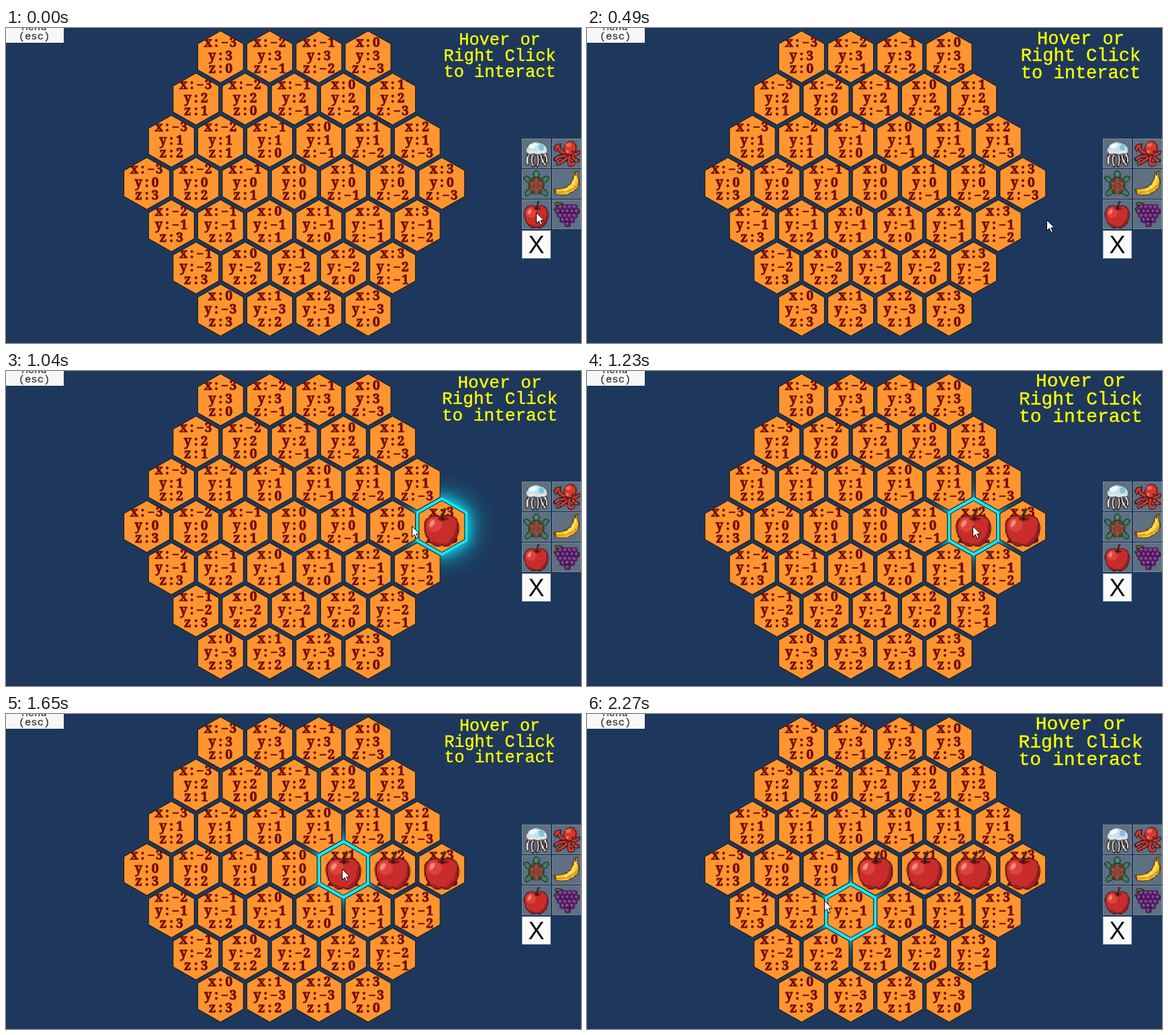
Write an HTML page with a canvas that moves like this. It is 856 by 470 pixels and loops after 2370 ms.

```html
<!DOCTYPE html>
<html lang="en">
<head>
<meta charset="utf-8">
<title>Hex board</title>
<style>
html, body { margin: 0; width: 100%; height: 100%; overflow: hidden; background: #1d385c; }
canvas { display: block; }
</style>
</head>
<body>
<canvas id="stage" width="856" height="470"></canvas>
<script>
const W = 856, H = 470, LOOP = 2370, LAST_CHANGE = 2270;
const ctx = document.getElementById('stage').getContext('2d');
const INK = '#241519';

// time, x, y of the pointer tip
const pointerPath = [
  [0, 789, 275], [230, 785, 277], [490, 685, 286], [560, 636, 284], [640, 604, 270],
  [700, 600, 254], [730, 615, 245], [820, 637, 238], [950, 637, 236], [1040, 604, 231],
  [1130, 575, 231], [1270, 573, 231], [1410, 510, 230], [1500, 503, 231], [1680, 500, 231],
  [1800, 442, 231], [1920, 417, 230], [2040, 420, 231], [2160, 372, 269], [2270, 353, 278]
];
// start time, hex x, hex y
const hovers = [
  [540, 3, -1], [650, 2, 0], [745, 3, 0], [1055, 2, 0],
  [1370, 1, 0], [1820, 0, 0], [2130, 0, -1]
];
// time, hex x on the middle row
const placements = [[870, 3], [1200, 2], [1600, 1], [2020, 0]];

function layer(w, h, draw) {
  const canvas = document.createElement('canvas');
  canvas.width = w;
  canvas.height = h;
  draw(canvas.getContext('2d'));
  return canvas;
}

function hexCenter(x, y) {
  return [429.2 + 73.2 * (x + y / 2), 232 - 63 * y];
}

function hexPath(c, cx, cy, half, tall) {
  c.beginPath();
  c.moveTo(cx, cy - tall);
  c.lineTo(cx + half, cy - tall / 2);
  c.lineTo(cx + half, cy + tall / 2);
  c.lineTo(cx, cy + tall);
  c.lineTo(cx - half, cy + tall / 2);
  c.lineTo(cx - half, cy - tall / 2);
  c.closePath();
}

function heavyText(c, text, x, y, extra) {
  c.lineWidth = extra;
  c.strokeStyle = c.fillStyle;
  c.fillText(text, x, y);
  c.strokeText(text, x, y);
}

function spacedText(c, text, cx, baseline, pitch) {
  [...text].forEach((ch, i) =>
    heavyText(c, ch, cx + (i - (text.length - 1) / 2) * pitch, baseline, .8));
}

function drawHex(c, x, y) {
  const [cx, cy] = hexCenter(x, y);
  hexPath(c, cx, cy, 34, 38.6);
  c.fillStyle = '#ff9530';
  c.fill();
  c.strokeStyle = '#16100c';
  c.lineWidth = 1;
  c.stroke();
  c.fillStyle = '#701006';
  c.font = 'bold 19px "Noto Serif", serif';
  c.textAlign = 'center';
  const label = (axis, n) => `${axis}:${n}`.replace('-', '\u2212');
  [label('x', x), label('y', y), label('z', -x - y)].forEach((text, i) =>
    spacedText(c, text, cx, cy - 15 + i * 19.5, 12.4));
}

const board = layer(W, H, c => {
  c.lineJoin = 'round';
  for (let y = 3; y >= -3; y--)
    for (let x = Math.max(-3, -3 - y); x <= Math.min(3, 3 - y); x++) drawHex(c, x, y);
});

// Sprites are drawn on a 32 unit grid and enlarged without smoothing.
function blob(c, fill, x, y, rx, ry = rx, turn = 0, edge) {
  c.beginPath();
  c.ellipse(x, y, rx, ry, turn, 0, 7);
  c.fillStyle = fill;
  c.fill();
  if (edge) {
    c.strokeStyle = edge;
    c.lineWidth = 1.2;
    c.stroke();
  }
}

function curve(c, color, width, path) {
  c.strokeStyle = color;
  c.lineWidth = width;
  c.lineCap = 'round';
  c.stroke(new Path2D(path));
}

function outlined(c, color, width, path) {
  curve(c, INK, width + 2, path);
  curve(c, color, width, path);
}

const sprite = draw => layer(32, 32, draw);

const apple = sprite(c => {
  const body = new Path2D('M16 9C12 5 6 6 3 12C1 19 5 27 10 30.5Q13 31.5 16 30Q19 31.5 22 30.5C28 27 31 18 28.5 12C26 6 20 5 16 9Z');
  c.strokeStyle = '#481012';
  c.lineWidth = 2;
  c.stroke(body);
  c.fillStyle = '#c92d2b';
  c.fill(body);
  c.save();
  c.clip(body);
  curve(c, '#982026', 3, 'M29 13Q30 24 20 31Q15 32 9 29');
  blob(c, '#de4339', 10, 14, 6, 6, .3);
  c.restore();
  blob(c, '#f2907e', 8, 13, 1.8, 3, .5);
  blob(c, '#7b191b', 17, 9, 4.5, 1.6);
  curve(c, '#301711', 2.4, 'M16.5 9.5Q16.5 5 18.5 1.5');
  curve(c, '#713521', .8, 'M17 8Q17 5 18.5 2');
});

const jellyfish = sprite(c => {
  ['M8 17Q4 22 6 28', 'M12 18Q9 24 12 30', 'M17 18Q20 23 17 30', 'M21 17Q22 24 26 29', 'M25 16Q29 21 28 26']
    .forEach(path => outlined(c, '#eadfd2', 1.8, path));
  const bell = new Path2D('M4 14C4 -1 29 -1 29 14Q25 19 22 16Q18 20 14 16Q8 20 4 14Z');
  c.fillStyle = '#c3e2ee';
  c.fill(bell);
  c.strokeStyle = '#58636f';
  c.lineWidth = 1.2;
  c.stroke(bell);
  blob(c, '#f1fbfc', 12, 7, 5, 3, -.5);
  blob(c, '#84bfdb', 22, 9, 3, 4);
  curve(c, '#f0e4d8', 2, 'M7 15Q11 13 14 15T25 14');
});

const octopus = sprite(c => {
  ['M18 17Q5 14 7 7Q2 8 4 12', 'M18 19Q7 18 3 23', 'M19 19Q13 25 6 28',
    'M20 19Q17 26 20 29Q24 30 24 27', 'M22 17Q25 25 29 24', 'M22 17Q26 18 30 15']
    .forEach(path => outlined(c, '#d9382e', 2.6, path));
  blob(c, '#d9382e', 20, 10, 7, 8, .4, '#64191d');
  blob(c, '#f36b4e', 18, 6, 3, 2.5);
  blob(c, '#f5dfc4', 17, 14, 1.4);
  blob(c, INK, 17, 14, .7);
  blob(c, INK, 23, 14, .9);
});

const turtle = sprite(c => {
  [[6, 11, .7], [26, 11, -.7], [7, 26, -.7], [25, 26, .7]].forEach(([x, y, turn]) =>
    blob(c, '#3f8260', x, y, 5, 2.8, turn, '#183a37'));
  blob(c, '#4b9168', 16, 5, 3.2, 4, 0, '#183a37');
  blob(c, '#713b2d', 16, 18, 9, 10, 0, '#263a2c');
  curve(c, '#8f7350', 1, 'M16 9V13L11 16V21L16 24L21 21V16L16 13M11 16L8 14M21 16L24 14M11 21L8 24M21 21L24 24M16 24V28');
  blob(c, '#9b4038', 16, 18.5, 3, 3.5);
});

const banana = sprite(c => {
  const skin = new Path2D('M25 3L29 2L28 7Q34 18 23 25Q13 31 3 27L2 23Q15 23 21 16Q25 11 25 3Z');
  c.strokeStyle = '#563c1a';
  c.lineWidth = 2;
  c.stroke(skin);
  c.fillStyle = '#f9c62f';
  c.fill(skin);
  curve(c, '#ffe46b', 2, 'M26 8Q26 18 14 24');
  curve(c, '#d58b20', 1.4, 'M29 15Q25 26 6 26');
  curve(c, '#634018', 2, 'M26.5 3V5M3 24L3.5 26');
});

const grapes = sprite(c => {
  outlined(c, '#6e7a3c', 1.6, 'M15 8Q10 3 4 4M9 5Q5 8 3 10');
  [4, 5, 4, 3, 1].forEach((count, row) => {
    for (let i = 0; i < count; i++) {
      const x = 17 + (i - (count - 1) / 2) * 5.4, y = 7.5 + row * 5;
      blob(c, '#742e86', x, y, 3, 3, 0, '#34173f');
      blob(c, '#b45bb5', x - .8, y - .9, 1);
    }
  });
});

function drawSprite(c, image, x, y, size) {
  c.imageSmoothingEnabled = false;
  c.drawImage(image, x, y, size, size);
}

const panel = layer(W, H, c => {
  [jellyfish, octopus, turtle, banana, apple, grapes].forEach((image, i) => {
    const x = 768 + (i % 2) * 45, y = 165 + Math.floor(i / 2) * 45.5;
    c.fillStyle = '#7c8894';
    c.fillRect(x, y, 43, 44);
    c.fillStyle = '#5e7082';
    c.fillRect(x + 1, y + 1, 41, 42);
    drawSprite(c, image, x + 1, y + 1.5, 41);
  });
  c.fillStyle = '#b9bec4';
  c.fillRect(768, 302, 43, 42);
  c.fillStyle = '#fafafa';
  c.fillRect(769, 303, 41, 40);
  c.textAlign = 'center';
  c.fillStyle = '#080808';
  c.font = '36px "Liberation Sans", Arial, sans-serif';
  c.fillText('X', 789.5, 336);

  c.fillStyle = '#f7f7f7';
  c.fillRect(0, 0, 86, 22);
  c.fillStyle = '#383838';
  c.font = '15.5px "Liberation Mono", monospace';
  heavyText(c, 'Menu', 42, 2.5, .3);
  heavyText(c, '(esc)', 42, 16.5, .3);
});

function drawGlow(t) {
  const hover = hovers.filter(h => h[0] <= t).pop();
  if (!hover) return;
  const [cx, cy] = hexCenter(hover[1], hover[2]);
  ctx.save();
  ctx.fillStyle = ctx.shadowColor = '#10eaff';
  hexPath(ctx, cx, cy, 38, 43.5);
  [42, 18].forEach(blur => {
    ctx.shadowBlur = blur;
    ctx.fill();
  });
  ctx.restore();
}

function drawTitle(t) {
  const width = 172 - 12 * Math.cos(Math.PI / 3 + t / 973 * Math.PI * 2);
  const size = width * .1525;
  ctx.fillStyle = '#ffff00';
  ctx.textAlign = 'center';
  ctx.font = `${size}px "Liberation Mono", monospace`;
  ['Hover or', 'Right Click', 'to interact'].forEach((line, i) =>
    heavyText(ctx, line, 735, 41 + (i - 1) * width * .143 + size * .31, .4));
}

function drawPointer(t) {
  const next = Math.max(1, pointerPath.findIndex(p => p[0] >= t));
  const [t0, x0, y0] = pointerPath[next - 1], [t1, x1, y1] = pointerPath[next];
  const k = (t - t0) / (t1 - t0);
  ctx.save();
  ctx.translate(Math.round(x0 + (x1 - x0) * k) + .5, Math.round(y0 + (y1 - y0) * k) + .5);
  const arrow = new Path2D('M0 0V16L3.7 12.5L6.5 18.5L9 17.3L6.3 11.5H11.3Z');
  ctx.fillStyle = '#fff';
  ctx.fill(arrow);
  ctx.strokeStyle = '#000';
  ctx.lineWidth = 1;
  ctx.stroke(arrow);
  ctx.restore();
}

function frame() {
  const t = Math.min(performance.now() % LOOP, LAST_CHANGE);
  ctx.fillStyle = '#1d385c';
  ctx.fillRect(0, 0, W, H);
  drawGlow(t);
  ctx.drawImage(board, 0, 0);
  placements.filter(p => p[0] <= t).forEach(([, x]) => {
    const [cx, cy] = hexCenter(x, 0);
    drawSprite(ctx, apple, cx - 29, cy - 28, 58);
  });
  ctx.drawImage(panel, 0, 0);
  drawTitle(t);
  drawPointer(t);
  requestAnimationFrame(frame);
}
frame();
</script>
</body>
</html>
```
